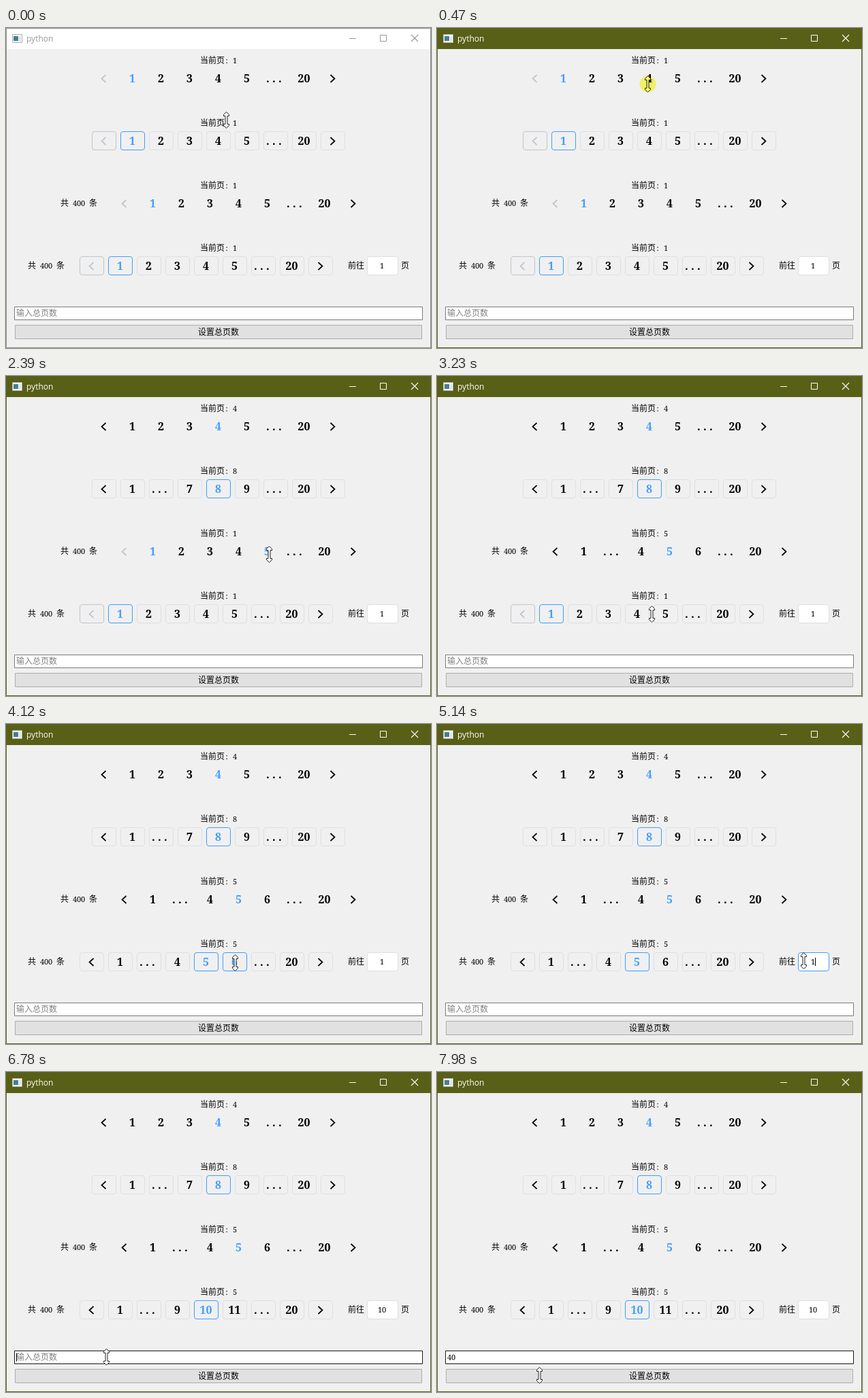
An HTML page with a canvas for the animation above (8 s loop, 624 by 471 pixels).

```html
<!DOCTYPE html>
<html lang="zh">
<head>
<meta charset="utf-8">
<title>python</title>
<style>
html, body { margin: 0; width: 100%; height: 100%; overflow: hidden; background: #f0f0f0; }
canvas { display: block; }
</style>
</head>
<body>
<canvas id="stage" width="624" height="471"></canvas>
<script>
const ctx = document.getElementById('stage').getContext('2d');
const LOOP = 8000, HOLD = 100, LAG = 70, BLINK = 480;
const BLUE = '#409eff', PALE = '#dcdfe6', MUTED = '#c0c4cc';

// Each row: centre, first slot, style and place of the total.
const rows = [
  { y: 74, x: 144 },
  { y: 166, x: 144, boxed: true },
  { y: 258, x: 174, total: 80 },
  { y: 350, x: 126, boxed: true, total: 32 }
];

// Where the pointer comes to rest: arrival time, x, y.
const stops = [
  [0, 323, 135], [400, 309, 82], [1160, 358, 184], [1430, 361, 167], [2380, 386, 262],
  [3230, 315, 350], [3710, 336, 351], [4670, 538, 348], [6500, 147, 419], [7980, 150, 446]
];
const ACTIVATE = 400, FIELD = 4670, TOTAL = 6500;
const presses = [ACTIVATE, 1430, 1640, 1770, 1900, 2430, 3840, FIELD, TOTAL];
const END = 5140, TYPE = 5270, ENTER = 5400, KEY4 = 7180, KEY0 = 7310;

const within = (v, a, b) => v >= a && v < b;
const clamp = v => Math.max(0, Math.min(1, v));
const pressed = t => presses.some(p => within(t, p, p + HOLD));

// Longer ways take longer; every move slows down as it arrives.
function pointer(t) {
  let [, x, y] = stops[0];
  for (const [arrive, tx, ty] of stops) {
    const time = 280 + 1.2 * Math.hypot(tx - x, ty - y);
    const u = clamp((t - arrive + time) / time);
    if (u === 0) break;
    const k = 1 - (1 - u) ** 2;
    x += (tx - x) * k;
    y += (ty - y) * k;
    if (u < 1) break;
  }
  return [x, y];
}

function hitSlot(row, [x, y]) {
  const dx = x - row.x + 18;
  const slot = Math.floor(dx / 42);
  return Math.abs(y - row.y) < 14 && slot >= 0 && slot < 9 && dx % 42 < 36 ? slot : -1;
}

function slots(page) {
  return page < 5
    ? ['<', 1, 2, 3, 4, 5, '...', 20, '>']
    : ['<', 1, '...', page - 1, page, page + 1, '...', 20, '>'];
}

function pageAt(row, t) {
  let page = 1;
  for (const p of presses) {
    if (p + HOLD > t) break;
    const item = slots(page)[hitSlot(row, pointer(p))];
    if (item > 0) page = item;
  }
  return page;
}

function rect(x, y, w, h, fill) {
  ctx.fillStyle = fill;
  ctx.fillRect(x, y, w, h);
}

function frame(x, y, w, h, fill, stroke, radius = 0) {
  ctx.beginPath();
  ctx.roundRect(x + .5, y + .5, w - 1, h - 1, radius);
  if (fill) { ctx.fillStyle = fill; ctx.fill(); }
  ctx.strokeStyle = stroke;
  ctx.lineWidth = 1;
  ctx.stroke();
}

function line(points, color, width) {
  ctx.beginPath();
  for (const [x, y] of points) ctx.lineTo(x, y);
  ctx.strokeStyle = color;
  ctx.lineWidth = width;
  ctx.stroke();
}

// Full-width glyphs take 12px cells, half-width ones 6px.
function label(text, x, y, color = '#000') {
  ctx.fillStyle = color;
  ctx.textAlign = 'center';
  for (const ch of text) {
    const wide = ch > '\u2000';
    const cell = wide ? 12 : 6;
    ctx.font = wide ? '12px "Noto Sans CJK SC", "Noto Sans CJK", sans-serif' : '11px "Noto Serif", serif';
    ctx.fillText(ch, x + cell / 2, y + 4);
    x += cell;
  }
}

function pageText(text, x, y, color) {
  ctx.fillStyle = color;
  ctx.font = 'bold 16px "Noto Serif", serif';
  ctx.textAlign = text === '...' ? 'left' : 'center';
  if (text === '...') for (let i = 0; i < 3; i++) ctx.fillText('.', x - 14 + 9 * i, y + 6);
  else ctx.fillText(text, x - .5, y + 6);
}

function chevron(x, y, dir, color) {
  line([[x - 3 * dir, y - 5], [x + 3 * dir, y + .5], [x - 3 * dir, y + 6]], color, 1.7);
}

function pager(row, t) {
  const clicked = pageAt(row, t);
  const page = row === rows[3] && t >= ENTER ? 10 : clicked;
  const hover = pressed(t) ? -1 : hitSlot(row, pointer(t - LAG));
  label('当前页: ' + clicked, 285, row.y - 26);
  if (row.total) label('共 400 条', row.total, row.y);
  slots(page).forEach((item, i) => {
    const x = row.x + 42 * i;
    const off = i === 0 && page === 1;
    const lit = item === page || (hover === i && !off);
    const color = lit ? BLUE : off ? MUTED : '#000';
    if (row.boxed) frame(x - 18, row.y - 14, 36, 28, null, lit ? BLUE : off ? MUTED : PALE, 3.5);
    if (i % 8 === 0) chevron(x - .5, row.y, i ? 1 : -1, color);
    else pageText(String(item), x, row.y, color);
  });
}

function caret(x, y, t, ...keys) {
  if (keys.some(key => within(t, key, key + BLINK))) rect(x, y - 6, 1, 12, '#000');
}

function jumpField(t) {
  const text = t < TYPE ? '1' : '10';
  const x = 552 - 3 * text.length;
  const selected = within(t, ENTER, TOTAL);
  label('前往', 502, 350);
  label('页', 580, 350);
  frame(530, 336, 46, 28, '#fff', within(t, FIELD - LAG, TOTAL) ? BLUE : PALE, 3.5);
  if (selected) rect(x - 1, 344, 13, 12, '#2f8ae8');
  label(text, x, 350, selected ? '#fff' : '#000');
  if (t < END) caret(x, 350, t, FIELD);
  else if (t < ENTER) caret(x + 6 * text.length, 350, t, END, TYPE);
}

function totalForm(t) {
  const shade = 122 - 99 * clamp((t - 6350) / 430);
  const text = t < KEY4 ? '' : t < KEY0 ? '4' : '40';
  frame(12, 410, 600, 20, '#fff', `rgb(${shade},${shade},${shade})`);
  if (text) label(text, 15, 420);
  else label('输入总页数', 15, 420, '#808080');
  caret(15 + 6 * text.length, 420, t, TOTAL, KEY4, KEY0);
  frame(13, 437, 598, 21, '#e1e1e1', '#adadad');
  label('设置总页数', 282, 448);
}

function titleBar(active) {
  const ink = active ? '#fff' : '#999';
  rect(0, 0, 624, 31, active ? '#585f16' : '#fff');
  frame(9, 9, 15, 13, '#fff', '#a9adb0');
  rect(11, 12, 7, 7, '#467f8e');
  rect(19, 12, 3, 8, '#dde2e5');
  ctx.font = '12px "Open Sans", sans-serif';
  ctx.textAlign = 'left';
  ctx.fillStyle = ink;
  ctx.fillText('python', 30, 20);
  rect(504, 15, 10, 1, ink);
  frame(549, 10, 10, 10, null, ink);
  line([[595, 10], [605, 20]], ink, 1.1);
  line([[605, 10], [595, 20]], ink, 1.1);
}

function cursor(t) {
  const [x, y] = pointer(t).map(v => Math.round(v) + .5);
  const quarter = [[0, -12], [4, -8], [4, -6], [1.5, -6]];
  const right = quarter.concat(quarter.map(([a, b]) => [a, -b]).reverse());
  const left = right.map(([a, b]) => [-a, b]).reverse();
  ctx.beginPath();
  for (const [a, b] of right.concat(left)) ctx.lineTo(x + a, y + b);
  ctx.closePath();
  ctx.fillStyle = '#fff';
  ctx.fill();
  ctx.strokeStyle = '#222';
  ctx.lineWidth = 1;
  ctx.stroke();
  if (!pressed(t)) return;
  ctx.globalCompositeOperation = 'multiply';
  ctx.beginPath();
  ctx.arc(x, y, 12, 0, Math.PI * 2);
  ctx.fillStyle = '#ffff70';
  ctx.fill();
  ctx.globalCompositeOperation = 'source-over';
}

function draw(t) {
  const active = t >= ACTIVATE;
  rect(0, 0, 624, 471, '#f0f0f0');
  titleBar(active);
  for (const row of rows) pager(row, t);
  jumpField(t);
  totalForm(t);
  frame(0, 0, 624, 471, null, active ? '#585f16' : '#8a8a8a');
  cursor(t);
}

const start = performance.now();
function tick() {
  draw((performance.now() - start) % LOOP);
  requestAnimationFrame(tick);
}
tick();
</script>
</body>
</html>
```
